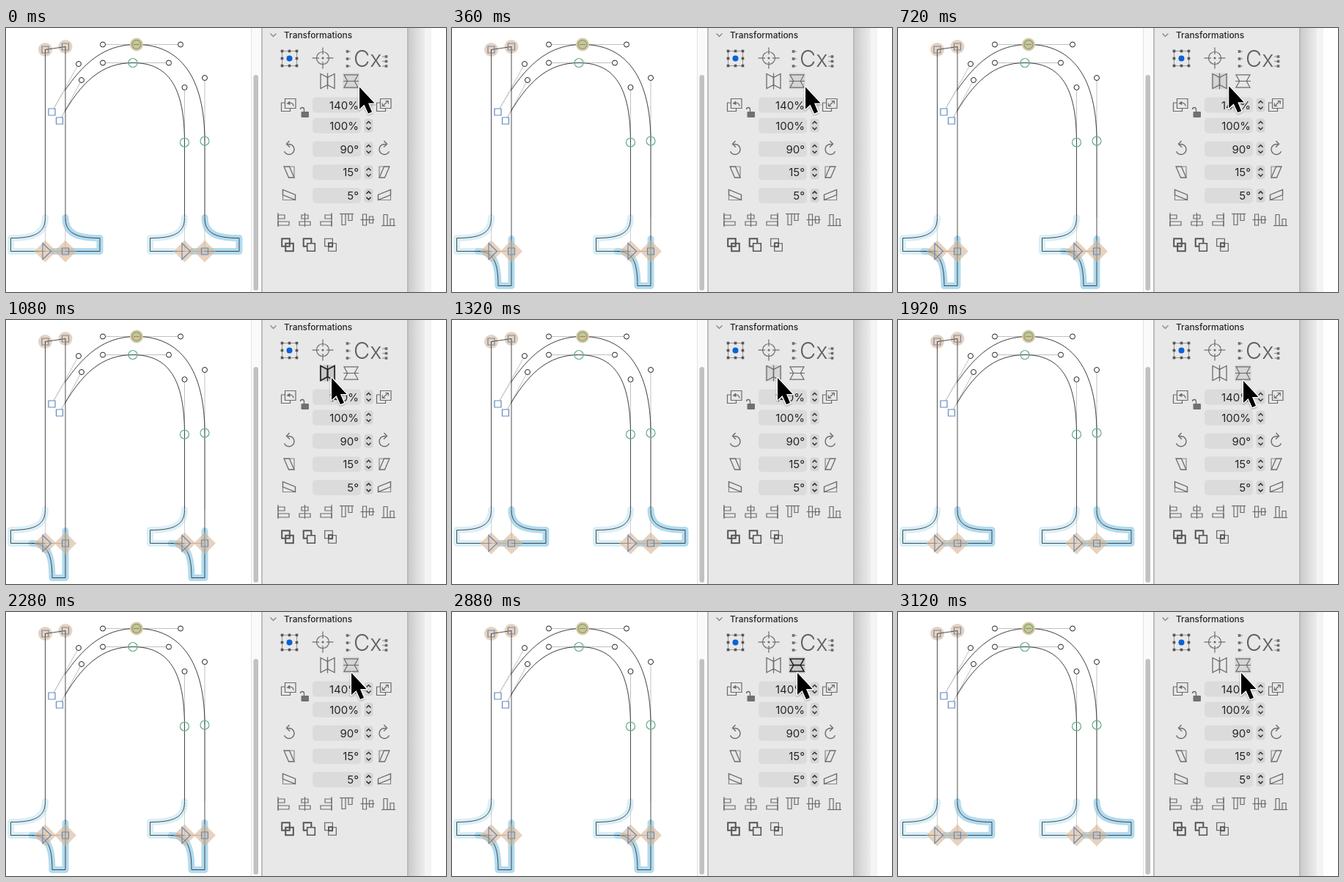
Animation, 600 px wide and 360 px high, one loop 3.24 s. Source, as an HTML page with a canvas:

```html
<!DOCTYPE html>
<html lang="en">
<head>
<meta charset="utf-8">
<title>Mirroring serifs</title>
<style>
html, body { margin: 0; width: 100%; height: 100%; overflow: hidden; background: #fff; }
canvas { display: block; width: 600px; height: 360px; }
</style>
</head>
<body>
<canvas id="stage" width="600" height="360"></canvas>
<script>
const ctx = document.getElementById('stage').getContext('2d');
const LOOP = 3240, STEP = 120;
const INK = '#222', ICON = '#6b6b6b', DARK = '#565656', PANEL = '#e8e8e8';
const BLUE = '#6589bd', GREEN = '#5bb087', TAN = 'rgba(216,180,144,.6)';
const STEM = 27.5, HAIR = 0.8, BASELINE = 304.5;

// Mouse button: [down, up]; every release mirrors the serifs
const clicks = [[120, 240], [1080, 1320], [2040, 2160], [2880, 3000]];
const isPressed = t => clicks.some(([down, up]) => t >= down && t < up);
const isFlipped = t => clicks.filter(([, up]) => t >= up).length % 2 === 1;

const progress = (t, from, to) => Math.min(1, Math.max(0, (t - from) / (to - from)));
const easeOut = p => 1 - (1 - p) ** 2;
const easeInOut = p => p * p * (3 - 2 * p);

function pointerAt(t) {
  const away = easeOut(progress(t, 360, 1000));
  const back = easeInOut(progress(t, 1320, 1800));
  const drift = progress(t, 2880, 3120);
  return [481 - 38 * away + 27 * back - 3 * drift, 79.5 - 1.5 * away + 4 * back];
}

function paint(fill, stroke, width = 1) {
  if (fill) { ctx.fillStyle = fill; ctx.fill(); }
  if (stroke) { ctx.strokeStyle = stroke; ctx.lineWidth = width; ctx.stroke(); }
}
function trace(pts) {
  ctx.beginPath();
  for (let i = 0; i < pts.length; i += 2) ctx.lineTo(pts[i], pts[i + 1]);
}
function line(pts, stroke = ICON, width = 1.2) {
  trace(pts);
  paint(null, stroke, width);
}
function poly(pts, fill, stroke, width) {
  trace(pts);
  ctx.closePath();
  paint(fill, stroke, width);
}
function circle(x, y, r, fill, stroke, width) {
  ctx.beginPath();
  ctx.arc(x, y, r, 0, 7);
  paint(fill, stroke, width);
}
function box(x, y, w, h, fill, stroke, width, radius = 0) {
  ctx.beginPath();
  ctx.roundRect(x, y, w, h, radius);
  paint(fill, stroke, width);
}
const square = (x, y, half, fill, stroke, width) =>
  box(x - half, y - half, 2 * half, 2 * half, fill, stroke, width);
function at(x, y, draw, a = 1, b = 0, c = 0, d = 1) {
  ctx.save();
  ctx.transform(a, b, c, d, x, y);
  draw();
  ctx.restore();
}
function label(text, x, y, size, align = 'left', weight = 500, color = '#262626') {
  ctx.font = `${weight} ${size}px Inter, sans-serif`;
  ctx.textAlign = align;
  ctx.fillStyle = color;
  ctx.fillText(text, x, y);
}

// Half a serif relative to its baseline node; `map` places each point
function serifPath(map, end) {
  ctx.beginPath();
  ctx.moveTo(...map(0, -46));
  ctx.bezierCurveTo(...map(0, -25), ...map(14, -18), ...map(47, -18));
  ctx.lineTo(...map(47, 0));
  ctx.lineTo(...map(end, 0));
}
const node = (x, y, fill) => square(x, y, 4.5, fill, BLUE, 1.2);

function foot(x, flipped) {
  const y = BASELINE, right = x + STEM;
  const leftMap = (dx, dy) => [x - dx, y + dy];
  const rightMap = flipped
    ? (dx, dy) => [right + dy, y + dx]
    : (dx, dy) => [right + dx, y + dy];
  ctx.lineCap = ctx.lineJoin = 'round';
  serifPath(leftMap, 15);
  paint(null, '#d9eff9', 9);
  serifPath(rightMap, -17);
  paint(null, '#b1dbef', 9);
  ctx.lineCap = 'butt';
  ctx.lineJoin = 'miter';
  line([x, 258, x, y], '#c5c5c5', HAIR);
  line([right, 258, right, y], flipped ? INK : '#b5b5b5', HAIR);
  for (const map of [leftMap, rightMap]) {
    serifPath(map, 0);
    paint(null, INK, HAIR);
  }
  line([x, y, right, y], '#999', HAIR);
  for (const cx of [x, right]) poly([cx - 15, y, cx, y - 15, cx + 15, y, cx, y + 15], TAN);
  poly([x - 3.5, y - 11, x - 3.5, y + 11, x + 8, y], null, BLUE, 1.2);
  node(right, y);
}

// Each contour: two Bézier segments of start, control, control, end
const outer = [
  [[62.5, 114.5], [99, 49], [132, 22.5], [178, 22.5]],
  [[178, 22.5], [238, 22.5], [271, 68], [271, 154]]
];
const inner = [
  [[73, 126.5], [103, 71], [132, 47.5], [173, 47.5]],
  [[173, 47.5], [222, 47.5], [243.5, 81], [243.5, 156]]
];
const segments = [...outer, ...inner];
const handles = segments.flatMap(([p, c, d, q]) => [[p, c], [q, d]]);

function arch(color, width) {
  ctx.beginPath();
  for (const contour of [outer, inner]) {
    ctx.moveTo(...contour[0][0]);
    for (const [, c, d, q] of contour) ctx.bezierCurveTo(...c, ...d, ...q);
    ctx.lineTo(contour[1][3][0], 258);
  }
  paint(null, color, width);
}
function glyph(flipped) {
  foot(53.5, flipped);
  foot(243.5, flipped);
  arch('#ccc', HAIR);
  handles.forEach(h => line(h.flat(), '#b0b0b0', HAIR));
  ctx.save();
  ctx.beginPath();
  ctx.rect(80.5, 0, 240, 360);
  ctx.clip();
  arch(INK, HAIR);
  ctx.restore();

  const top = [[53.5, 29.5], [81, 25.5]];
  top.forEach(p => circle(...p, 9.5, TAN));
  line([53.5, 258, ...top.flat(), 81, 258], INK, HAIR);
  top.forEach(p => node(...p));
  [outer, inner].forEach(c => node(...c[0][0], '#fff'));

  circle(178, 22.5, 9, '#dcc8a8');
  circle(178, 22.5, 6, '#c9c6a0', '#83ae76', 1.6);
  line([174, 22.5, 182, 22.5], '#c47a58');
  [inner[0][3], inner[1][3], outer[1][3]].forEach(p => circle(...p, 6, null, GREEN, 1.2));
  handles.forEach(([, end]) => circle(...end, 3.5, '#fff', INK, 1));
}

function windowFrame() {
  box(334, 0, 14, 360, '#fafafa');
  box(334, 0, 1, 360, '#e2e2e2');
  box(337.5, 64, 6.5, 294, '#c1c1c1', null, 0, 3.2);
  box(348, 0, 200, 360, PANEL);
  box(348, 0, 2, 360, '#bdbdbd');
  const shade = ctx.createLinearGradient(547, 0, 571, 0);
  shade.addColorStop(0, '#c8c8c8');
  shade.addColorStop(1, '#ededed');
  box(547, 0, 24, 360, shade);
  box(547, 0, 1.5, 360, '#b5b5b5');
  box(571, 0, 9, 360, '#f4f4f4');
}

function field(text, y) {
  box(418, y - 10.5, 66, 21, '#dbdbdb', null, 0, 5);
  label(text, 481, y + 5.5, 15, 'right', 400);
  box(488.5, y - 9.5, 12, 19, '#d5d5d5', null, 0, 4);
  for (const s of [-1, 1])
    line([491.5, y + 2.5 * s, 494.5, y + 5.5 * s, 497.5, y + 2.5 * s], '#333', 1.5);
}

function originIcons() {
  at(386.5, 41.5, () => {
    square(0, 0, 10, null, '#999', 1);
    for (const x of [-1, 0, 1]) for (const y of [-1, 0, 1])
      if (x || y) square(10 * x, 10 * y, 1.8, DARK);
    circle(0, 0, 4, '#0a62d6');
  });
  at(432, 41, () => {
    circle(0, 0, 8.5, null, ICON, 1.2);
    circle(0, 0, 1.6, ICON);
    for (let i = 0; i < 4; i++) {
      line([5, 0, 14.5, 0]);
      ctx.rotate(Math.PI / 2);
    }
  });
  label('Cx', 474, 53, 30.5, 'left', 300, '#606060');
  for (let i = 0; i < 3; i++) {
    const left = 32 + 10 * i, right = 39 + 6.5 * i;
    line([465, left, 470, left], '#999');
    line([513, right, 518, right], '#999');
    square(465.5, left, 1.8, ICON);
    square(518.5, right, 1.8, ICON);
  }
}

function flipIcon(cx, cy, upright, state) {
  if (state) square(cx, cy, 11, state === 'pressed' ? '#c8c8c8' : '#d6d6d6');
  const color = state === 'pressed' ? INK : ICON, width = state === 'pressed' ? 1.7 : 1.3;
  const draw = () => {
    for (const s of [-1, 1]) poly([9.5 * s, -10, 0, -5, 0, 5, 9.5 * s, 10], null, color, width);
    line([0, -11, 0, 11], color);
  };
  if (upright) at(cx, cy, draw);
  else at(cx, cy, draw, 0, 0.9, 0.95, 0);
}

function scaleIcons() {
  for (const cx of [386, 516]) at(cx, 105, () => {
    box(-10.5, -3, 12, 11.5, null, ICON, 1.2);
    box(-5.5, -8.5, 14.5, 13, PANEL, ICON, 1.2);
  });
  ctx.beginPath();
  ctx.arc(387.5, 106.5, 4.5, -2.2, 0);
  paint(null, ICON, 1.3);
  poly([382.5, 103, 387, 99.5, 387.5, 105], ICON);
  line([513.5, 106.5, 521, 99.5]);
  for (const s of [-1, 1]) at(517.3, 103, () => line([0, -3.5, 4, -3.5, 4, 0.5]), s, 0, 0, s);

  box(402.5, 114, 10.5, 8, '#707070', null, 0, 1);
  ctx.beginPath();
  ctx.arc(404, 111, 2.5, Math.PI, 0);
  ctx.lineTo(406.5, 114);
  paint(null, ICON, 1.3);
}

function turnIcons() {
  const rotate = () => {
    ctx.beginPath();
    ctx.arc(0, 0, 7, -1.9, 2.75);
    paint(null, ICON, 1.4);
    line([0.5, -11.5, -3.5, -7.2, 1, -3], ICON, 1.4);
  };
  const slantX = () => {
    line([0, -7.5, 7, -7.5, 7, 7.5], '#888');
    at(0, 0, () => box(-3.7, -7.5, 7.4, 15, null, ICON, 1.4), 1, 0, 0.43, 1);
  };
  const slantY = () => {
    line([-8.5, 0, -8.5, 7, 8.5, 7], '#888');
    at(0, 0, () => box(-8.5, -3.5, 17, 7, null, ICON, 1.4), 1, 0.4);
  };
  [rotate, slantX, slantY].forEach((draw, i) => {
    const y = 165.5 + 31 * i;
    at(386, y, draw);
    at(516, y, draw, -1);
  });
}

// Two bars against a guide; `side` is -1, 0 or 1
function alignIcon(side, lengths) {
  lengths.forEach((length, i) =>
    box(side * (8 - length / 2) - length / 2, 9 * i - 6.5, length, 5, null, ICON, 1.2));
  line([8 * side, -9.5, 8 * side, 9.5]);
}
function alignIcons() {
  for (let i = 0; i < 6; i++) {
    const x = 379 + 28.5 * i, side = i % 3 - 1;
    if (i < 3) at(x, 261.5, () => alignIcon(side, [9, 15]));
    else at(x, 261.5, () => alignIcon(side, [15, 9]), 0, 1, 1, 0);
  }
}

function booleanIcons() {
  const pair = (x, first, second) => at(x, 296, () => {
    square(-2.5, -3.5, 5.3, null, DARK, first);
    square(2.5, 3, 5.3, second.fill, DARK, second.width);
  });
  pair(384, 2, { width: 2 });
  pair(413.5, 2, { width: 1.6, fill: PANEL });
  pair(442.5, 1.1, { width: 1.1 });
  square(442.5, 295.7, 2.6, null, DARK, 1.8);
}

function panel(hover, pressed) {
  const state = pressed ? 'pressed' : 'hover';
  line([360.5, 7.5, 364.5, 11.5, 368.5, 7.5], '#8a8a8a', 1.4);
  label('Transformations', 379, 14, 11.9);
  originIcons();
  flipIcon(438.5, 72.5, true, hover === 'h' && state);
  flipIcon(470.5, 72.5, false, hover === 'v' && state);
  scaleIcons();
  field('140%', 105);
  field('100%', 133);
  ['90°', '15°', '5°'].forEach((text, i) => field(text, 165 + 31.7 * i));
  turnIcons();
  alignIcons();
  booleanIcons();
}

function pointer(x, y) {
  const arrow = [1, 1, 1, 31, 7.5, 25, 13, 37, 18, 35, 13, 23, 21.5, 23];
  at(x, y, () => {
    ctx.lineJoin = 'round';
    ctx.shadowColor = 'rgba(0,0,0,.3)';
    ctx.shadowBlur = 2;
    ctx.shadowOffsetY = 1;
    poly(arrow, '#fff', '#fff', 3);
    ctx.shadowColor = 'transparent';
    poly(arrow, '#000');
  });
}

function draw(now) {
  const t = Math.floor(now % LOOP / STEP) * STEP;
  const [x, y] = pointerAt(t);
  ctx.fillStyle = '#fff';
  ctx.fillRect(0, 0, 600, 360);
  glyph(isFlipped(t));
  windowFrame();
  panel(x < 459 ? 'h' : 'v', isPressed(t));
  pointer(x, y);
}

let start;
function tick(now) {
  start ??= now;
  draw(now - start);
  requestAnimationFrame(tick);
}
draw(0);
requestAnimationFrame(tick);
</script>
</body>
</html>
```
